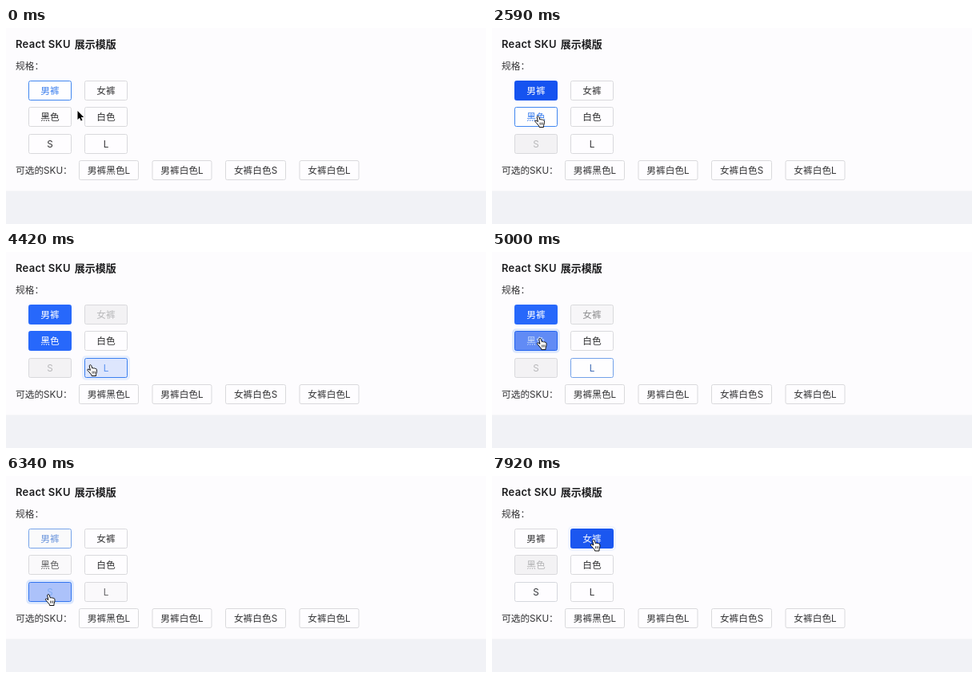
Animation, 600 px wide and 246 px high, one loop 8 s. Source, as an HTML page:

```html
<!DOCTYPE html>
<html lang="zh-CN">
<head>
<meta charset="utf-8">
<title>SKU</title>
<style>
html, body { margin: 0; width: 100%; height: 100%; overflow: hidden; background: #f1f2f6; }
svg { display: block; width: 600px; height: 246px; }
text { font: 11.7px Inter, "Noto Sans CJK SC", "Noto Sans CJK", sans-serif; fill: #343436; }
text.title { font-size: 13px; font-weight: 600; fill: #1d1d1f; }
.mid { text-anchor: middle; }
</style>
</head>
<body>
<svg id="stage" viewBox="0 0 600 246">
  <rect width="600" height="204.5" fill="#fdfcfe"/>
  <text class="title" x="12" y="25" letter-spacing=".3">React SKU</text>
  <text class="title" x="85.7" y="25">展示模版</text>
  <text x="12" y="52.4">规格：</text>
  <text x="12" y="182.8">可选的SKU：</text>
  <g id="buttons"></g>
  <g id="arrow">
    <path d="M0 0V11L2.5 8.7 4.2 12.6 6 11.8 4.3 8H7.7Z" fill="#000" stroke="#fff" stroke-width=".8" paint-order="stroke"/>
  </g>
  <g id="hand">
    <path d="M3.2 2a1.3 1.3 0 0 1 2.5-.5L6.8 5q1-.9 2 .1 1-.6 1.8.3 1.4-.3 1.7 1 .6 2.4-.3 4.6l-.5 1.6v1.9H6.1l-.3-1.4Q4 11 2.5 9.2L1 7.6Q.4 6.1 2 6l2.4 1.5Z" fill="#fff" stroke="#111" stroke-linejoin="round"/>
    <path d="M7 8.6v3M8.7 8.6v3M10.4 8.6v3" fill="none" stroke="#111" stroke-width=".7"/>
  </g>
</svg>
<script>
const LOOP = 8000, FPS = 12, FADE = 300;
const $ = id => document.getElementById(id);

// text, fill and border of each button state
const STATES = {
  normal:   [[51, 51, 53], [254, 253, 255], [217, 217, 220]],
  disabled: [[184, 184, 186], [243, 242, 244], [217, 217, 220]],
  outline:  [[62, 128, 238], [254, 254, 255], [64, 134, 240]],
  selected: [[255, 255, 255], [39, 104, 251], [39, 104, 251]],
  active:   [[255, 255, 255], [21, 83, 240], [21, 83, 240]]
};

// moments of the clicks
const MALE_ON = 805, BLACK_ON = 2640, L_ON = 3400, L_OFF = 4215, BLACK_OFF = 4870,
      MALE_OFF = 5270, S_ON = 6200, S_OFF = 6912, FEMALE_ON = 7672;

const OPTIONS = [
  { label: '男裤', start: 'outline', clicks: [MALE_ON, MALE_OFF],
    steps: [[MALE_ON, 'active'], [BLACK_ON, 'selected'], [5130, 'active'], [MALE_OFF, 'outline'], [S_ON, 'disabled'], [S_OFF, 'normal']] },
  { label: '女裤', clicks: [FEMALE_ON],
    steps: [[BLACK_ON, 'disabled'], [BLACK_OFF, 'normal'], [7480, 'outline'], [FEMALE_ON, 'active']] },
  { label: '黑色', clicks: [BLACK_ON, BLACK_OFF],
    steps: [[1930, 'outline'], [BLACK_ON, 'active'], [L_ON, 'selected'], [4720, 'active'], [BLACK_OFF, 'outline'],
            [MALE_OFF, 'normal'], [S_ON, 'disabled'], [S_OFF, 'normal'], [FEMALE_ON, 'disabled']] },
  { label: '白色', clicks: [], steps: [] },
  { label: 'S', clicks: [S_ON, S_OFF],
    steps: [[MALE_ON, 'disabled'], [MALE_OFF, 'normal'], [6000, 'outline'], [S_ON, 'active'], [S_OFF, 'outline'], [FEMALE_ON, 'normal']] },
  { label: 'L', clicks: [L_ON, L_OFF],
    steps: [[3170, 'outline'], [L_ON, 'active'], [L_OFF, 'outline'], [BLACK_OFF, 'normal'], [S_ON, 'disabled'], [S_OFF, 'normal']] }
];

// time, x, y of the pointer's hot spot
const PATH = [
  [170, 89.5, 104], [585, 46.5, 79], [1600, 46.5, 79], [2170, 55, 113], [2400, 55, 113],
  [2560, 57, 111], [2900, 57, 111], [3240, 105, 142], [4430, 105, 142], [4830, 60, 112],
  [4950, 60, 112], [5200, 56, 82], [5380, 56, 82], [5583, 83.5, 93], [5800, 84, 118],
  [6080, 52.5, 149], [7120, 52.5, 149], [7580, 126.5, 80.5]
];

const clamp = v => Math.min(1, Math.max(0, v));
const mix = (a, b, p) => a + (b - a) * p;
const easeInOut = p => p < .5 ? 4 * p ** 3 : 1 - 4 * (1 - p) ** 3;
const smooth = p => p * p * (3 - 2 * p);
const rgb = c => `rgb(${c.map(Math.round)})`;

function add(parent, tag, attrs, label) {
  const el = document.createElementNS('http://www.w3.org/2000/svg', tag);
  for (const k in attrs) el.setAttribute(k, attrs[k]);
  if (label) el.textContent = label;
  return parent.appendChild(el);
}

function addButton(x, y, w, label) {
  const g = add($('buttons'), 'g');
  const wave = add(g, 'rect', { fill: '#2f7bf5', opacity: 0 });
  const box = add(g, 'rect', { x: x + .5, y: y + .5, width: w - 1, height: 24, rx: 2,
    fill: rgb(STATES.normal[1]), stroke: rgb(STATES.normal[2]) });
  const text = add(g, 'text', { class: 'mid', x: x + w / 2, y: y + 16.6 }, label);
  return { x, y, w, wave, box, text };
}

OPTIONS.forEach((o, i) =>
  Object.assign(o, addButton(28 + i % 2 * 70, [66, 99, 133][i >> 1], 54, o.label)));
[['男裤黑色L', 91, 75], ['男裤白色L', 182.5, 75], ['女裤白色S', 274, 76], ['女裤白色L', 366.5, 75]]
  .forEach(([label, x, w]) => addButton(x, 166, w, label));

function colorsAt(o, t) {
  let now = STATES[o.start || 'normal'];
  for (const [at, name] of o.steps) {
    const p = easeInOut(clamp((t - at) / FADE));
    now = now.map((c, i) => c.map((v, j) => mix(v, STATES[name][i][j], p)));
  }
  return now;
}

function pointerAt(t) {
  const i = PATH.findIndex(p => p[0] > t);
  if (i === 0) return PATH[0].slice(1);
  if (i < 0) return PATH[PATH.length - 1].slice(1);
  const [t0, x0, y0] = PATH[i - 1], [t1, x1, y1] = PATH[i];
  const p = smooth((t - t0) / (t1 - t0));
  return [mix(x0, x1, p), mix(y0, y1, p)];
}

function drawWave(o, t) {
  const age = t - Math.max(-LOOP, ...o.clicks.filter(c => c <= t));
  const grow = 3 * (1 - (1 - clamp(age / 250)) ** 3);
  const attrs = { x: o.x - grow, y: o.y - grow, width: o.w + 2 * grow, height: 25 + 2 * grow,
    rx: 2 + grow, opacity: .3 * clamp(1 - age / FADE) };
  for (const k in attrs) o.wave.setAttribute(k, attrs[k]);
}

function render(t) {
  for (const o of OPTIONS) {
    const [ink, fill, border] = colorsAt(o, t);
    o.text.style.fill = rgb(ink);
    o.box.setAttribute('fill', rgb(fill));
    o.box.setAttribute('stroke', rgb(border));
    drawWave(o, t);
  }
  const [x, y] = pointerAt(t);
  // the pointer shape follows the hovered element with a short delay
  const [hx, hy] = pointerAt(t - 80);
  const over = OPTIONS.some(o => hx >= o.x && hx <= o.x + o.w && hy >= o.y && hy <= o.y + 25);
  $('hand').setAttribute('transform', `translate(${x - 4} ${y - 1})`);
  $('arrow').setAttribute('transform', `translate(${x} ${y})`);
  $('hand').style.display = over ? '' : 'none';
  $('arrow').style.display = over ? 'none' : '';
}

const begin = performance.now();
function tick() {
  const t = Math.max(0, performance.now() - begin) % LOOP;
  render(Math.floor(t * FPS / 1000 + .01) * 1000 / FPS);
  requestAnimationFrame(tick);
}
tick();
</script>
</body>
</html>
```
